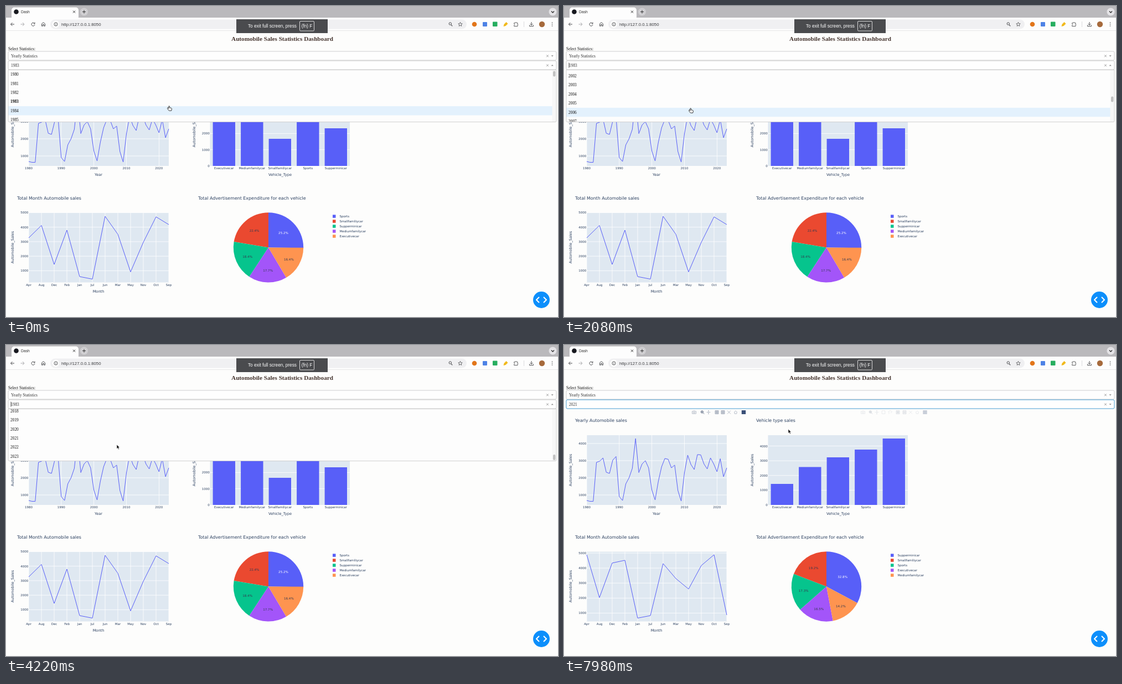
Recreate the animation shown at these times as an HTML page with a canvas. Size 997 by 562 pixels, loop 8000 ms.

```html
<!DOCTYPE html>
<html>
<head>
<meta charset="utf-8">
<style>
html, body { margin: 0; width: 100%; height: 100%; overflow: hidden; background: #fdfdfc; }
canvas { display: block; width: 997px; height: 562px; }
</style>
</head>
<body>
<canvas></canvas>
<script>
const W = 997, H = 562, LOOP = 8000;
const canvas = document.querySelector('canvas');
const c = canvas.getContext('2d');
const dpr = window.devicePixelRatio || 1;
canvas.width = W * dpr;
canvas.height = H * dpr;

const SERIF = '"Liberation Serif", serif', SANS = '"Liberation Sans", sans-serif', PLOT = '"DejaVu Sans", sans-serif';
const INK = '#2a3f5f', BLUE = '#585ff8', PAPER = '#fdfdfc', PLOT_BG = '#dfe8f1';
const PIE_COLORS = [BLUE, '#ea4930', '#06c48d', '#a355f9', '#fe9450'];
const ROW = 16.4, MENU_TOP = 115.5, MENU_BOTTOM = 209.5, SELECT_AT = 5920, UPDATE_AT = 6020;

// Keyframes: time, then values
const SCROLL = [[60, 0], [440, 175], [700, 190], [1100, 190], [1550, 358], [2850, 358], [3100, 368], [3600, 590], [4000, 627.6]];
const POINTER = [[0, 295, 182], [440, 294, 178], [1000, 294, 178], [1600, 229, 186], [2500, 229, 186], [3100, 206, 186],
  [3600, 200, 180], [4300, 200, 180], [5200, 222, 168], [6000, 223, 168], [6460, 223, 171], [7200, 223, 171], [7980, 405, 152]];

const YEARLY = [281, 282.5, 282.5, 212, 210, 204, 230, 232, 208, 201.5, 274, 281, 251, 240, 223, 169, 230.5, 215, 209, 222, 262, 280,
  246, 220, 205, 206.5, 222, 217, 263, 282, 231, 199, 216, 225, 198, 198.5, 215, 224, 204, 215, 229, 205.5, 238, 222];
const MONTHS = 'Apr Aug Dec Feb Jan Jul Jun Mar May Nov Oct Sep'.split(' ');
const TYPES = ['Executivecar', 'Mediumfamilycar', 'Smallfamiliycar', 'Sports', 'Supperminicar'];
const DATA = {
  1983: {
    months: [419, 396.5, 467, 405, 489, 493.5, 380, 412.5, 480.5, 427, 381, 395], monthTop: 373.5, monthStep: 26.2,
    bars: [190, 180, 240, 185, 221], barStep: 29.3,
    pie: [25.2, 22.4, 18.4, 17.7, 16.4], legend: [3, 2, 4, 1, 0],
  },
  2021: {
    months: [379, 456.5, 394, 389, 493.5, 489, 395, 422, 441, 398.5, 379, 488], monthTop: 376, monthStep: 27.1,
    bars: [251, 220.5, 203, 189, 169], barStep: 26.6,
    pie: [32.8, 19.2, 17.3, 16.5, 14.2], legend: [4, 2, 3, 0, 1],
  },
};

function track(keys, t) {
  const i = keys.findIndex(k => k[0] > t);
  if (i === 0) return keys[0].slice(1);
  if (i < 0) return keys[keys.length - 1].slice(1);
  const a = keys[i - 1], b = keys[i], u = (t - a[0]) / (b[0] - a[0]), e = u * u * (3 - 2 * u);
  return a.slice(1).map((v, j) => v + (b[j + 1] - v) * e);
}

function text(s, x, y, size, color = INK, family = PLOT, align = 'left', weight = '') {
  c.font = `${weight} ${size}px ${family}`;
  c.textAlign = align;
  c.fillStyle = color;
  c.fillText(s, x, y + size * 0.36);
}
function rect(x, y, w, h, color) {
  c.fillStyle = color;
  c.fillRect(x, y, w, h);
}
function box(x, y, w, h, r, fill, stroke, width = 1) {
  c.beginPath();
  c.roundRect(x, y, w, h, r);
  if (fill) { c.fillStyle = fill; c.fill(); }
  if (stroke) { c.strokeStyle = stroke; c.lineWidth = width; c.stroke(); }
}
function disc(x, y, r, fill, stroke, width = 1) {
  box(x - r, y - r, 2 * r, 2 * r, r, fill, stroke, width);
}
function path(d, x, y, stroke, width = 1, fill) {
  c.save();
  c.translate(x, y);
  const p = new Path2D(d);
  if (fill) { c.fillStyle = fill; c.fill(p); }
  if (stroke) { c.strokeStyle = stroke; c.lineWidth = width; c.stroke(p); }
  c.restore();
}
function polyline(x, step, ys) {
  c.beginPath();
  ys.forEach((y, i) => c.lineTo(x + i * step, y));
  c.strokeStyle = BLUE;
  c.lineWidth = 1;
  c.lineJoin = 'round';
  c.stroke();
}

function browser() {
  rect(0, 0, W, 21, '#bab9bc');
  rect(0, 21, W, 24, '#fdfdfd');
  rect(0, 44.3, W, 0.7, '#dededf');
  box(10, 2.5, 121, 22, 5, '#fdfdfd');
  disc(18.5, 10.5, 4.3, '#17181f');
  text('Dash', 27, 10.5, 6.8, '#333', SANS);
  path('M-2-2L2 2M2-2L-2 2', 123, 10.5, '#333', 1);
  disc(141, 10.5, 7, '#d0cfd2');
  path('M-3 0H3M0-3V3', 141, 10.5, '#333', 1);
  disc(987.5, 10.5, 7, '#e4e3e6');
  path('M-2.5-1L0 1.5L2.5-1', 987.5, 10.5, '#222', 1.2);

  const arrow = 'M3.5 0H-3M0-3L-3 0L0 3', dark = '#4c4d50';
  path(arrow, 11.5, 33, dark);
  path('M-3.5 0H3M0-3L3 0L0 3', 30, 33, '#a9a9ac');
  path('M2.6-1.5A3 3 0 1 0 3 .8M3-3.4V-1H.6', 49, 33, dark);
  path('M-3 3.2V-.8L0-3.4L3-.8V3.2H1V.5H-1V3.2Z', 67.5, 33, dark);
  box(80, 24.5, 752, 17, 8.5, '#f0f0f2');
  disc(90, 33, 6.5, '#fdfdfd');
  disc(90, 33, 3.1, null, dark, 0.9);
  path('M0-1.7V-.9M0-.2V1.8', 90, 33, dark, 0.9);
  text('http://127.0.0.1:8050', 100, 33, 7.8, '#3c3d40', SANS);
  disc(802.3, 32, 2.2, null, dark);
  path('M1 1L3.3 3.3', 803, 33, dark, 1.1);
  path('M0-3.7L1.1-1.2L3.7-1L1.7.8L2.3 3.3L0 2L-2.3 3.3L-1.7.8L-3.7-1L-1.1-1.2Z', 820.5, 33, dark, 0.8);

  disc(846, 33, 4.3, '#e2761b');
  box(861, 29, 8, 8, 1, '#4e83e6');
  box(879, 28.5, 8.5, 8.5, 1, '#27ae60');
  path('M-4 4L-3 0L1-4L4-1L0 3Z', 902.5, 33, null, 1, '#f1b91c');
  path('M-3.3-2.3H-1A1.2 1.2 0 0 1 1.4-2.3H3V0A1.2 1.2 0 0 1 3 2V3.6H-3.3V1.7A1.2 1.2 0 0 0-3.3-.6Z', 921, 33, dark, 0.9);
  rect(935, 28, 0.8, 10, '#d5d5d8');
  path('M0-4V1.5M-2.5-1L0 1.5L2.5-1M-3.5 1.5V3.5H3.5V1.5', 949, 33, dark);
  disc(968, 33, 5.2, '#a66a3c');
  for (const dy of [-3, 0, 3]) disc(986.5, 33 + dy, 0.8, dark);
}

function fullscreenNote() {
  rect(416, 24, 165, 25, '#4a4b4e');
  text('To exit full screen, press', 437, 36.3, 8.2, '#fff', SANS);
  box(530.5, 27.5, 26, 17.5, 1.5, null, '#e8e8e8', 0.9);
  text('(fn) F', 543.5, 36.3, 8.2, '#fff', SANS, 'center');
}

function dropdown(y, value, border, open) {
  box(4, y, 990, 16, 2, '#fefefe', border, 0.9);
  text(value, 9, y + 8, 7.4, '#333', SERIF);
  path('M-1.9-1.9L1.9 1.9M1.9-1.9L-1.9 1.9', 978, y + 8.3, '#888', 0.8);
  path(open ? 'M-2 1H2L0-1.2Z' : 'M-2-1H2L0 1.2Z', 986.7, y + 8.3, null, 1, '#888');
}

function menu(scroll, hovered) {
  rect(4, MENU_TOP, 990, MENU_BOTTOM - MENU_TOP, '#fdfdfd');
  c.save();
  c.beginPath();
  c.rect(4, MENU_TOP, 990, MENU_BOTTOM - MENU_TOP);
  c.clip();
  for (let i = 0; i < 44; i++) {
    const y = MENU_TOP + i * ROW - scroll;
    if (i === hovered) rect(4, y, 983, ROW, '#e3f1fd');
    text(1980 + i, 8, y + 8, 7.4, '#111', SERIF, 'left', i === 3 ? 'bold' : '');
  }
  c.restore();
  rect(986.5, MENU_TOP, 7, 94, '#f7f7f7');
  box(988, 117.5 + scroll / 627.6 * 80.5, 4.4, 10, 2, '#c1c1c1');
  box(4, MENU_TOP, 990, MENU_BOTTOM - MENU_TOP, [0, 0, 2, 2], null, '#c6c6c6', 0.8);
}

function axisTitle(s, x, y, vertical) {
  c.save();
  c.translate(x, y);
  if (vertical) c.rotate(-Math.PI / 2);
  text(s, 0, 0, 6.6, INK, PLOT, 'center');
  c.restore();
}

function yTicks(x, width, top, step, from, to) {
  for (let k = from; k <= to; k++) {
    const y = top - k * step;
    if (k) rect(x, y - 0.4, width, 0.8, '#fff');
    text(k * 1000, x - 0.7, y, 5.5, INK, PLOT, 'right');
  }
}

function lineCharts(d) {
  text('Yearly Automobile sales', 20, 136, 7.9);
  rect(41, 163, 253, 126, PLOT_BG);
  for (let y = 1980; y <= 2020; y += 10) {
    const x = 41 + (y - 1980) * 253 / 43;
    rect(x - 0.4, 163, 0.8, 126, '#fff');
    text(y, x, 293, 5.5, INK, PLOT, 'center');
  }
  yTicks(41, 253, 302, 31, 1, 4);
  polyline(41, 253 / 43, YEARLY);
  axisTitle('Year', 167, 305);
  axisTitle('Automobile_Sales', 12, 226, true);

  text('Total Month Automobile sales', 20, 347, 7.9);
  rect(41, 373.5, 253, 126, PLOT_BG);
  MONTHS.forEach((m, i) => {
    rect(40.6 + i * 23, 373.5, 0.8, 126, '#fff');
    text(m, 41 + i * 23, 503.7, 5.5, INK, PLOT, 'center');
  });
  yTicks(41, 253, d.monthTop + 5 * d.monthStep, d.monthStep, 1, 5);
  polyline(41, 23, d.months);
  axisTitle('Month', 167, 516);
  axisTitle('Automobile_Sales', 12, 436, true);
}

function barChart(d) {
  text('Vehicle type sales', 347, 136, 7.9);
  rect(368.5, 163, 252.5, 126, PLOT_BG);
  yTicks(368.5, 252.5, 289, d.barStep, 0, 4);
  TYPES.forEach((name, i) => {
    rect(373.6 + i * 50.5, d.bars[i], 40.4, 289 - d.bars[i], BLUE);
    text(name, 393.8 + i * 50.5, 293, 5.5, INK, PLOT, 'center');
  });
  axisTitle('Vehicle_Type', 495, 305);
  axisTitle('Automobile_Sales', 340, 226, true);
}

function pieChart(d) {
  const cx = 474, cy = 436.4, turn = Math.PI / 50;
  text('Total Advertisement Expenditure for each vehicle', 347, 347, 7.9);
  // The largest slice runs clockwise from the top, the others counterclockwise.
  let end = 0;
  d.pie.forEach((share, i) => {
    const from = i ? end - share : 0, mid = (from + share / 2) * turn - Math.PI / 2, r = 51 - 0.52 * share;
    if (i) end = from;
    c.beginPath();
    c.moveTo(cx, cy);
    c.arc(cx, cy, 63.2, from * turn - Math.PI / 2, (from + share) * turn - Math.PI / 2);
    c.fillStyle = PIE_COLORS[i];
    c.fill();
    text(share + '%', cx + r * Math.cos(mid), cy + r * Math.sin(mid), 5.6, i ? '#353b50' : '#fff', PLOT, 'center');
    rect(590, 377.3 + i * 9, 5.5, 5.5, PIE_COLORS[i]);
    text(TYPES[d.legend[i]], 602.5, 380 + i * 9, 5.5);
  });
}

const ICONS = {
  camera: 'M-3.5-1.8H-1.5L-.8-2.8H.8L1.5-1.8H3.5V2.6H-3.5ZM1.4.4A1.4 1.4 0 1 0-1.4.4A1.4 1.4 0 1 0 1.4.4',
  zoom: 'M1.6-.6A2.2 2.2 0 1 0-2.8-.6A2.2 2.2 0 1 0 1.6-.6M1 1L3.2 3.2M-1.8-.6H.6M-.6-1.8V.6',
  pan: 'M-3.5 0H3.5M0-3.5V3.5M-1-2.5L0-3.5L1-2.5M-1 2.5L0 3.5L1 2.5',
  select: 'M-2.8-2.8H2.8V2.8H-2.8Z',
  lasso: 'M-2.5 3L-1.5 1A3 2 0 1 1 1 1.2',
  plus: 'M-3-3H3V3H-3ZM-2 0H2M0-2V2',
  minus: 'M-3-3H3V3H-3ZM-2 0H2',
  auto: 'M-3-3L3 3M3-3L-3 3',
  home: 'M-3 .2L0-2.6L3 .2M-2 0V2.6H2V0',
};
function modebar(slots, logoX, alpha) {
  c.globalAlpha = Math.max(0, Math.min(1, alpha));
  for (const [name, x] of Object.entries(slots)) {
    const solid = name === 'plus' || name === 'minus';
    if (solid) rect(x - 3, 118.5, 6, 6, '#c3c8d1');
    path(ICONS[name], x, 121.5, solid ? '#aab2bf' : name === 'zoom' ? '#68768c' : '#b6bdc8', 1);
  }
  rect(logoX - 3.7, 118, 7.4, 7, '#3a4f77');
  c.globalAlpha = 1;
}

function pointer(x, y, kind) {
  if (kind === 'cross') {
    path('M-3.5 0H3.5M0-3.5V3.5', x, y, '#333', 0.9);
  } else if (kind === 'hand') {
    path('M-1.2 0Q-.3-1 .5 0V2.6L3.6 3.2Q4.6 3.6 4.4 5L3.7 8H-.5L-3.3 4.6Q-3-.1-1.2 4.2Z', x, y - 0.8, '#222', 0.9, '#fff');
  } else {
    path('M0 0V7.6L1.8 6L3 8.8L4.4 8.2L3.2 5.5H5.5Z', x, y, '#fff', 0.6, '#111');
  }
}

function draw(t) {
  c.setTransform(dpr, 0, 0, dpr, 0, 0);
  rect(0, 0, W, H, PAPER);
  const open = t < SELECT_AT;
  const [scroll] = track(SCROLL, t), [x, y] = track(POINTER, t);
  const data = DATA[t < UPDATE_AT ? 1983 : 2021];

  browser();
  text('Automobile Sales Statistics Dashboard', 499, 59, 11.17, '#45342e', SERIF, 'center', 'bold');
  text('Select Statistics:', 4, 77.3, 7.45, '#111', SERIF);
  lineCharts(data);
  barChart(data);
  pieChart(data);
  dropdown(82, 'Yearly Statistics', '#c9c9c9', false);
  dropdown(99, open ? '1983' : '2021', open ? '#c6c6c6' : '#3391cc', open);

  const hovering = t < 60 || (t > 1580 && t < 3120) || t > 4320;
  if (open) {
    menu(scroll, hovering ? Math.floor((y - MENU_TOP + scroll) / ROW) : -1);
    const blink = t % 1600;
    if (blink > 450 && blink < 1250) rect(8.6, 102.5, 0.8, 9, '#222');
  } else {
    modebar({ camera: 235, zoom: 250, pan: 261, plus: 276, minus: 287, auto: 298, home: 310 }, 324.5, (t - UPDATE_AT) / 300);
    modebar({ camera: 540, zoom: 554, pan: 565, select: 577, lasso: 589, plus: 603, minus: 615, auto: 626, home: 638 }, 652,
      (t - 7900) / 300);
  }

  fullscreenNote();
  disc(967, 531, 15, '#0d8ffb');
  path('M-4-5L-9 0L-4 5M4-5L9 0L4 5', 967, 531, '#fff', 2.1);

  const inPlot = !open && x > 41 && x < 294 && y > 163 && y < 289;
  const onRow = open && hovering && (t < 2900 || t > 4320);
  pointer(x, y, inPlot ? 'cross' : onRow ? 'hand' : 'arrow');
}

function tick() {
  draw(performance.now() % LOOP);
  requestAnimationFrame(tick);
}
tick();
</script>
</body>
</html>
```
